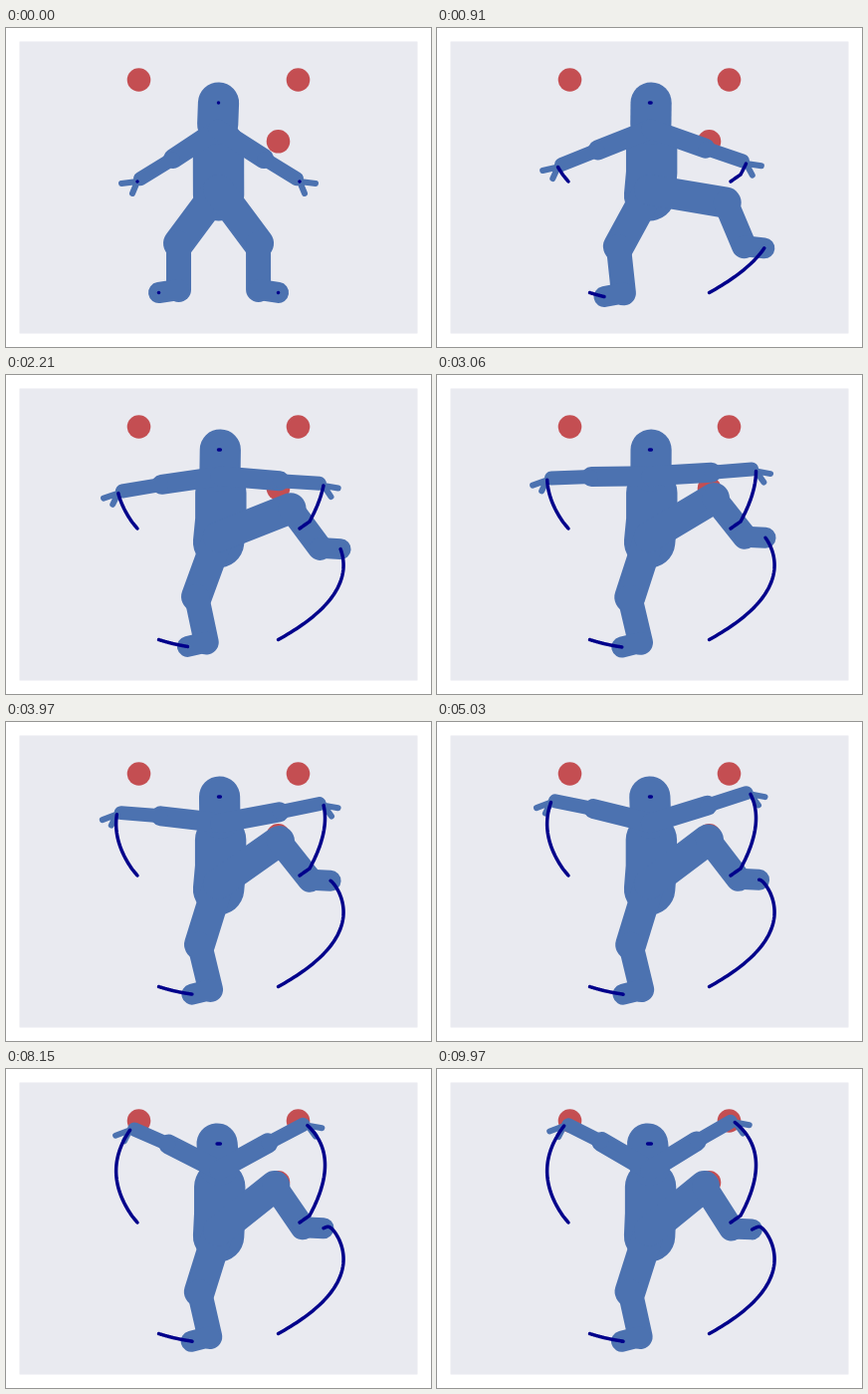
These frames come from a looping animation (427x320 px, 10 s). An HTML page:

```html
<!DOCTYPE html>
<html lang="en">
<head>
<meta charset="utf-8">
<title>Reaching figure</title>
<style>
html, body { margin: 0; width: 100%; height: 100%; overflow: hidden; background: #fff; }
svg { display: block; width: 100vw; height: 100vh; }
path { fill: none; stroke-linecap: round; stroke-linejoin: round; }
</style>
</head>
<body>
<svg viewBox="0 0 427 320">
  <rect x="13.5" y="13.5" width="400" height="293" fill="#e9eaf0"/>
  <g fill="#c44e52">
    <circle cx="133.5" cy="52" r="11.8"/>
    <circle cx="293.5" cy="52" r="11.8"/>
    <circle cx="273.5" cy="113.8" r="11.8"/>
  </g>
  <g id="body" stroke="#4c72b0"></g>
  <g id="trails" stroke="#00008b" stroke-width="3.5"></g>
</svg>
<script>
const LOOP = 10000, STEP = 40;
const NUDGE = 0.35; // seconds of the short first move of the arms
const PELVIS = [213.6, 167.7], HIP = [213.5, 162.3];

const add = (p, x, y) => [p[0] + x, p[1] + y];
const mix = (a, b, k) => a + (b - a) * k;
const mixPoint = (p, q, k) => p.map((v, i) => mix(v, q[i], k));
const bezier = (a, c, b, k) => mixPoint(mixPoint(a, c, k), mixPoint(c, b, k), k);

// Eases from 0 to 1: slow start, then exponential settling.
const settle = (sec, rate) => 1 - 3 / (2 + Math.exp(rate * sec));
const armEase = sec => settle(Math.max(0, sec - NUDGE), 0.45);
const legEase = sec => settle(sec, 1.27);

// Upper joints make a straight nudge, then follow a curve.
const upper = (rest, from, ctrl, to) => sec => sec < NUDGE
  ? mixPoint(rest, from, sec / NUDGE)
  : bezier(from, ctrl, to, armEase(sec));

// Leg joints follow a curve while drifting steadily.
const lower = (from, ctrl, to, dx, dy = 0) => sec =>
  add(bezier(from, ctrl, to, legEase(sec)), dx * sec, dy * sec);

const joints = {
  head: upper([213.5, 75], [214.8, 75], [216.8, 75], [211.2, 75]),
  chest: upper([213.5, 118], [215.5, 118], [216.5, 118], [214.4, 118]),
  elbowL: upper([168, 131], [165, 127.5], [144.2, 98.1], [167, 71]),
  elbowR: upper([259, 131], [266, 127], [288.5, 90.1], [258.5, 71]),
  handL: upper([132, 154], [127, 148], [92.6, 99.2], [130.5, 53.5]),
  handR: upper([295, 154], [305, 147], [340, 82.7], [296, 51]),
  kneeL: lower([173.5, 216], [184, 220], [195.6, 223.3], -0.15),
  kneeR: lower([253.5, 216], [322, 168], [275.5, 117.5], -0.7),
  toeL: lower([153.5, 265.5], [171, 271], [189, 273.2], -0.35),
  toeR: lower([273.5, 265.5], [369, 213], [330, 154.4], -1.35, 0.65)
};

const line = pts => "M" + pts.map(p => p[0].toFixed(2) + " " + p[1].toFixed(2)).join("L");

function newPath(parent, width) {
  const el = document.createElementNS("http://www.w3.org/2000/svg", "path");
  if (width) el.setAttribute("stroke-width", width);
  document.getElementById(parent).appendChild(el);
  return el;
}

const limbs = { thigh: 31, shin: 25, foot: 21, arm: 20, forearm: 14, fingers: 6 };
const parts = { torso: newPath("body", 51.4), head: newPath("body", 41.2) };
for (const side of "LR")
  for (const limb in limbs) parts[limb + side] = newPath("body", limbs[limb]);

const trails = ["head", "handL", "handR", "toeL", "toeR"].map(name => {
  const pts = [];
  for (let t = 0; t <= LOOP; t += STEP) pts.push(joints[name](t / 1000));
  return { name, pts, el: newPath("trails") };
});

function draw(t) {
  const sec = t / 1000, u = armEase(sec), q = legEase(sec), p = {};
  for (const name in joints) p[name] = joints[name](sec);
  const set = (name, ...pts) => parts[name].setAttribute("d", line(pts));
  const shoulder = add(p.chest, -0.6, -16.7);

  set("torso", PELVIS, add(p.chest, 0, 27), p.chest);
  set("head", p.head, add(p.chest, -0.8, -21.5));
  for (const side of "LR") {
    const left = side === "L", dir = left ? -1 : 1;
    const [elbow, hand, knee, toe] = ["elbow", "hand", "knee", "toe"].map(n => p[n + side]);
    const wrist = add(hand, -dir * mix(3, 4.3, q), mix(-2.8, -0.6, u));
    const ankle = add(toe, -dir * mix(20, left ? 18.6 : 20.8, q), mix(-3, left ? -4.7 : -0.9, q));
    set("arm" + side, shoulder, elbow);
    set("forearm" + side, elbow, wrist);
    set("fingers" + side,
      add(hand, dir * mix(16, 14.5, q), mix(2, left ? 5.5 : 2.7, q)),
      hand,
      add(hand, dir * mix(5, left ? 5.6 : 8, q), mix(12, 11, q)));
    set("thigh" + side, HIP, knee);
    set("shin" + side, knee, ankle);
    set("foot" + side, ankle, toe);
  }
  const n = Math.floor(t / STEP) + 1;
  for (const { name, pts, el } of trails)
    el.setAttribute("d", line([...pts.slice(0, n), p[name]]));
}

const start = performance.now();
function tick(now) {
  draw(Math.max(0, now - start) % LOOP);
  requestAnimationFrame(tick);
}
draw(0);
requestAnimationFrame(tick);
</script>
</body>
</html>
```
